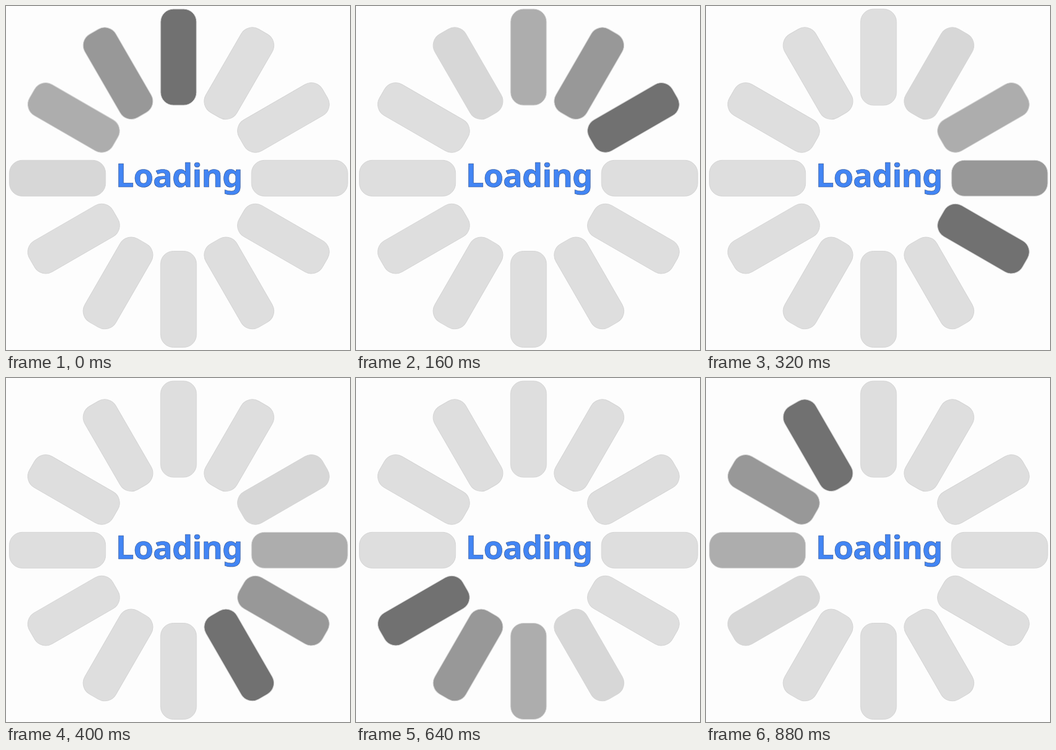
Write an HTML page that moves like this. It is 576 by 576 pixels and loops after 0.96 s.

```html
<!DOCTYPE html>
<html lang="en">
<head>
<meta charset="utf-8">
<title>Loading</title>
<style>
  html, body { margin: 0; width: 100%; height: 100%; overflow: hidden; background: #fdfdfd; }
  svg { display: block; width: 576px; height: 576px; }
  .bar { fill: #dedede; stroke: #d4d4d4; stroke-width: 1; animation: trail 960ms step-end infinite; }
  .label {
    font: 700 54px "Noto Sans", sans-serif;
    letter-spacing: -.7px;
    fill: #4285f4;
    stroke: #2c4a80;
    stroke-width: .6;
  }
  /* twelve hard steps of 80 ms: head, three fading followers, rest */
  @keyframes trail {
    0% { fill: #717171; }
    8.3333% { fill: #989898; }
    16.6667% { fill: #adadad; }
    25% { fill: #d7d7d7; }
    33.3333%, 100% { fill: #dedede; }
  }
</style>
</head>
<body>
<svg viewBox="0 0 576 576">
  <g id="bars" transform="translate(288.9 288.3)"></g>
  <text class="label" x="183.8" y="303">Loading</text>
</svg>
<script>
  const COUNT = 12, STEP = 80;
  const bar = i => `<rect class="bar" x="-30" y="-283.2" width="60" height="161" rx="21.5"
    transform="rotate(${i * 360 / COUNT})"
    style="animation-delay:${(i - COUNT) * STEP}ms"/>`;
  document.getElementById('bars').innerHTML = Array.from({ length: COUNT }, (_, i) => bar(i)).join('');
</script>
</body>
</html>
```
